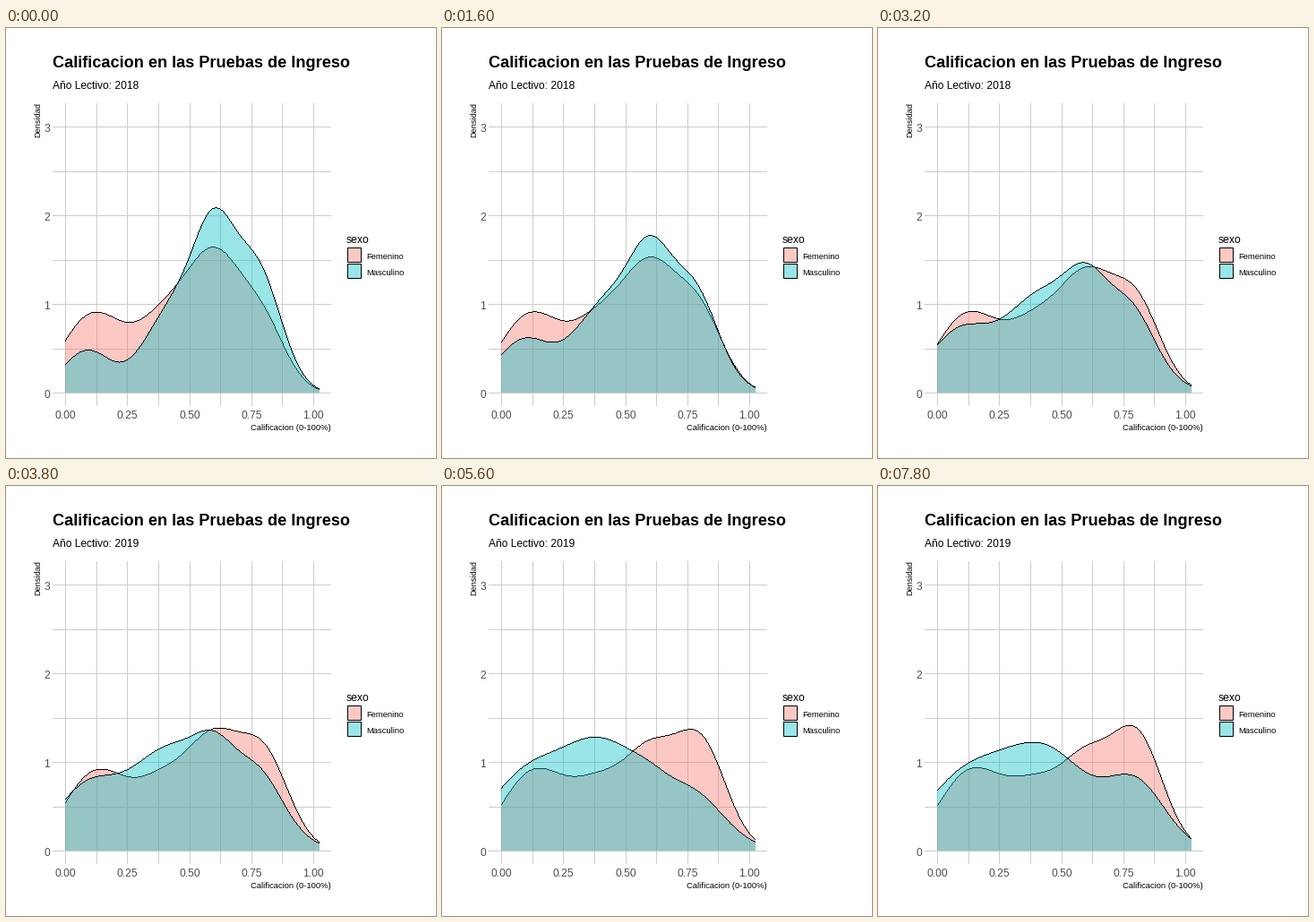
These frames come from a looping animation (480 by 480 pixels, 8 s). A matplotlib script:

```python
import numpy as np
import matplotlib.pyplot as plt
from matplotlib.animation import FuncAnimation

SIZE, DPI = 480, 80
PX = 72 / DPI                 # one pixel in points
FRAMES, STEP = 40, 200
YEAR_FRAMES = 33              # frames from one school year to the next
KEYS = [0, YEAR_FRAMES, FRAMES - 1]
X0, Y0 = 66.5, 407.5          # pixel position of the data origin
X_UNIT, Y_UNIT = 277, 99
EDGES = np.arange(66, 351)    # pixel columns under the curves

plt.rcParams["font.family"] = ["Liberation Sans", "DejaVu Sans"]

# Each density is a sum of bell curves: height, centre, width
FEMALE_2018 = [(.855, .105, .12), (.90, .42, .13),
               (1.20, .61, .10), (.77, .79, .095)]
FEMALE_2019 = [(.87, .13, .125), (.70, .40, .12),
               (.80, .60, .095), (1.30, .80, .105)]
MALE_2018 = [(.47, .085, .095), (.95, .44, .12),
             (1.45, .602, .083), (1.33, .775, .095)]
MALE_2019 = [(.75, .08, .165), (1.21, .395, .18), (.43, .79, .14)]
MALE_LAST = [(.80, .11, .165), (1.08, .44, .17), (.72, .80, .12)]


def density(bells):
    score = (EDGES - X0) / X_UNIT
    return sum(h * np.exp(-((score - c) / w) ** 2 / 2) for h, c, w in bells)


fig = plt.figure(figsize=(SIZE / DPI, SIZE / DPI), dpi=DPI, facecolor="white")
ax = fig.add_axes([0, 0, 1, 1])
ax.axis("off")


def label(x, y, text, size, **style):
    return ax.text(x, y, text, fontsize=size * PX, va="baseline", **style)


def grid_line(xs, ys):
    ax.plot(xs, ys, color="#cccccc", lw=PX, solid_capstyle="butt",
            snap=False, zorder=1)


for k in range(9):
    x = np.floor(X0 + X_UNIT * k / 8) + .5
    grid_line([x, x], [84, 422])
    if k % 2 == 0:
        label(x - .5, 436, f"{k / 8:.2f}", 12, ha="center", color="#4d4d4d")
for k in range(7):
    y = np.floor(Y0 - Y_UNIT * k / 2) + .5
    grid_line([52, 363], [y, y])
    if k % 2 == 0:
        label(49, y + 5.5, str(k // 2), 12, ha="right", color="#4d4d4d")

label(52, 44, "Calificacion en las Pruebas de Ingreso", 18.15, weight="bold")
subtitle = label(52, 68, "", 11.95)
label(363, 449, "Calificacion (0-100%)", 9.4, ha="right")
label(38, 83.5, "Densidad", 9.1, ha="right", rotation=90,
      rotation_mode="anchor")
label(380, 240, "sexo", 12.3)


class Density:
    """Filled curve with a crisp one-pixel outline, and its legend entry."""

    def __init__(self, stages, color, name, key_y, z):
        self.stages = np.array([density(s) for s in stages])
        flat = np.zeros(len(EDGES) - 1)
        self.area = ax.stairs(flat, EDGES, fill=True, lw=0, color=color,
                              alpha=.4, zorder=z)
        self.line = ax.stairs(flat, EDGES, baseline=flat, fill=True, lw=0,
                              color="black", zorder=z + .5)
        for style in (dict(fc=color, alpha=.4, lw=0),
                      dict(fc="none", ec="black", lw=PX)):
            ax.add_patch(plt.Rectangle((381.5, key_y), 15, 16, snap=False,
                                       **style))
        label(402.5, key_y + 12.8, name, 9.4)

    def show(self, frame):
        weights = [np.interp(frame, KEYS, row) for row in np.eye(len(KEYS))]
        y = np.floor(Y0 - Y_UNIT * (weights @ self.stages))
        top = np.minimum(y[:-1], y[1:])
        bottom = np.maximum(top + 1, np.maximum(y[:-1], y[1:]))
        self.area.set_data(top, EDGES, np.full_like(top, np.floor(Y0)))
        self.line.set_data(top, EDGES, bottom)


groups = [
    Density([FEMALE_2018, FEMALE_2019, FEMALE_2019],
            "#F8766D", "Femenino", 245.5, 2),
    Density([MALE_2018, MALE_2019, MALE_LAST],
            "#00BFC4", "Masculino", 263.5, 3),
]
ax.set_xlim(0, SIZE)
ax.set_ylim(SIZE, 0)


def draw(frame):
    for group in groups:
        group.show(frame)
    subtitle.set_text(f"Año Lectivo: {2018 + round(frame / YEAR_FRAMES)}")
    return [subtitle]


anim = FuncAnimation(fig, draw, frames=FRAMES, interval=STEP,
                     repeat=True, repeat_delay=0, blit=False)
plt.show()
```
